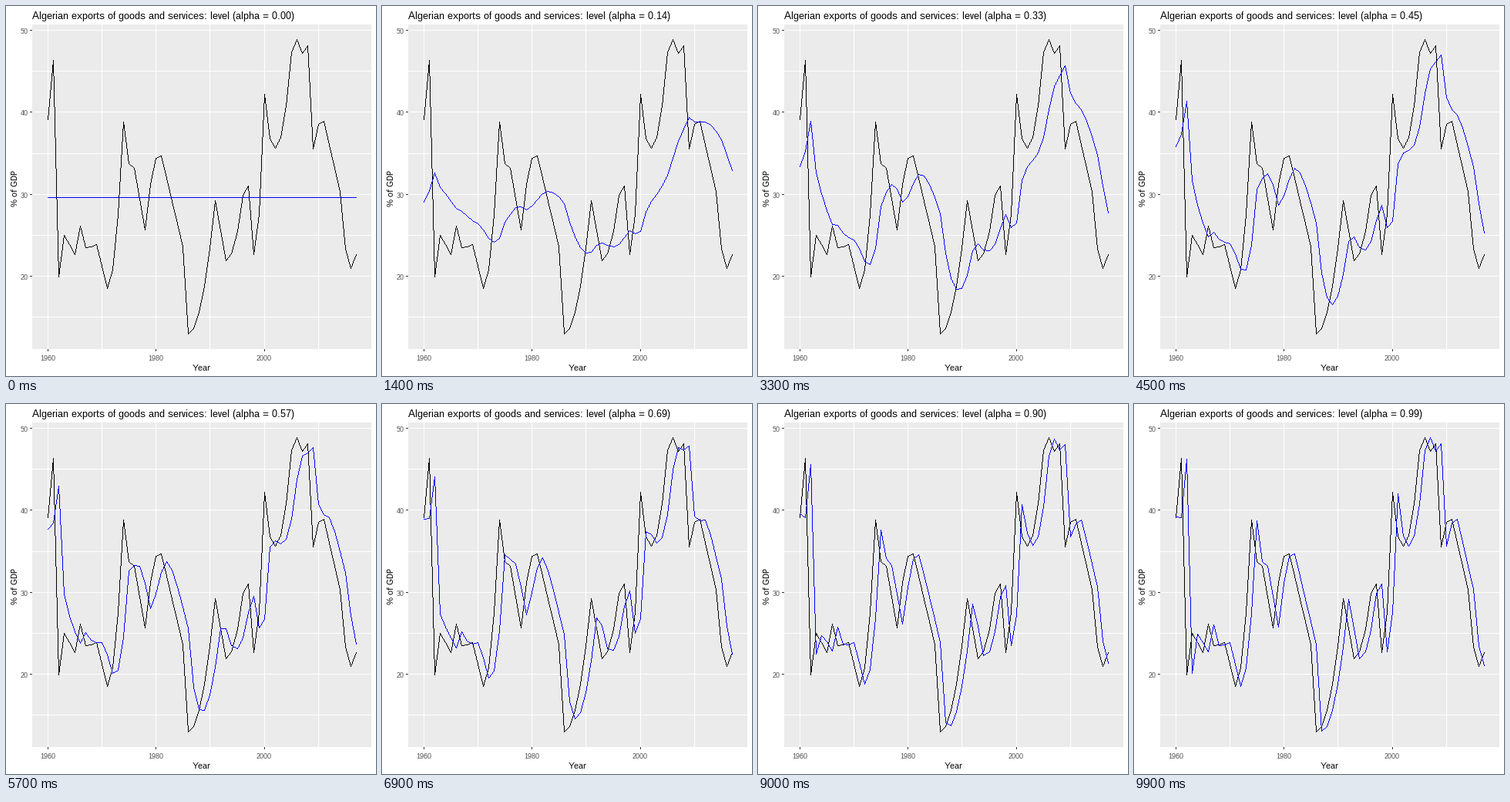
Recreate the animation shown at these times as a matplotlib script. Size 480 by 480 pixels, loop 10 s.

```python
import numpy as np
import matplotlib.pyplot as plt
from matplotlib.animation import FuncAnimation
from matplotlib.patches import Rectangle

SIZE, DPI = 480, 96
PX = 72 / DPI  # points per pixel
FRAMES, INTERVAL = 100, 100
LEFT, TOP, RIGHT, BOTTOM = 34, 24, 474, 445

plt.rcParams.update({
    "font.family": "Liberation Sans",
    "text.hinting": "default",
    "text.hinting_factor": 1,
})

# Corners of the export curve: years after 1960 and % of GDP
CORNERS = {
    0: 39, 1: 46.2, 2: 19.8, 3: 24.9, 5: 22.6, 6: 26, 7: 23.4, 9: 23.8,
    11: 18.4, 14: 38.7, 15: 33.6, 16: 33.1, 18: 25.6, 19: 31.1, 20: 34.3,
    21: 34.6, 25: 23.5, 26: 12.9, 31: 29.1, 33: 21.8, 36: 29.8, 37: 30.9,
    38: 22.6, 40: 42.1, 41: 36.7, 42: 35.5, 45: 47.2, 46: 48.8, 47: 47.1,
    48: 48, 49: 35.4, 50: 38.4, 51: 38.8, 54: 30.2, 55: 23.2, 56: 20.9,
    57: 22.6,
}


def yearly(corners):
    """Yearly values: falls are straight, rises start slowly."""
    points = list(corners.items())
    values = [points[0][1]]
    for (t0, a), (t1, b) in zip(points, points[1:]):
        t = np.arange(1, t1 - t0 + 1) / (t1 - t0)
        values.extend(a + (b - a) * t ** (2 if b > a else 1))
    return np.array(values)


def smooth(start, alpha, data):
    """One-step-ahead levels of simple exponential smoothing."""
    levels = [start]
    for value in data[:-1]:
        levels.append(alpha * value + (1 - alpha) * levels[-1])
    return np.array(levels)


def best_levels(alpha, data):
    """Smoothed levels with the least-squares starting level."""
    base = smooth(0, alpha, data)
    decay = (1 - alpha) ** np.arange(len(data))
    start = decay @ (data - base) / (decay @ decay)
    return base + start * decay


def to_x(year):
    return np.rint(53.9 + 400 * (year - 1960) / 57).astype(int)


def to_y(value):
    return np.rint(31 + 10.64 * (50 - value)).astype(int)


def trace(values):
    """Pixels of a one-pixel polyline through the yearly values."""
    x, y = to_x(1960 + np.arange(len(values))), to_y(values)
    steps = np.maximum(np.abs(np.diff(x)), np.abs(np.diff(y)))
    at = np.append(0, np.cumsum(steps))
    t = np.arange(at[-1] + 1)
    return np.rint(np.interp(t, at, x)), np.rint(np.interp(t, at, y))


fig = plt.figure(figsize=(SIZE / DPI, SIZE / DPI), dpi=DPI, facecolor="white")
ax = fig.add_axes([0, 0, 1, 1])
ax.set(xlim=(0, SIZE), ylim=(SIZE, 0))
ax.axis("off")


def bar(x, y, w, h, color):
    ax.add_patch(Rectangle((x, y), w, h, fc=color, lw=0, antialiased=False))


def label(x, y, text, size, color="black", **kw):
    return ax.text(x, y, text, fontsize=size * PX, color=color, **kw)


def curve(values, color):
    return ax.plot(*trace(values), ",", color=color, antialiased=False)[0]


bar(LEFT, TOP, RIGHT - LEFT, BOTTOM - TOP, "#ebebeb")
for value in range(15, 51, 5):
    bar(LEFT, to_y(value), RIGHT - LEFT, 1, "white")
for year in range(1960, 2011, 10):
    bar(to_x(year), TOP, 1, BOTTOM - TOP, "white")

for value in range(20, 51, 10):
    y = to_y(value)
    bar(LEFT - 3, y, 3, 1, "#333333")
    label(29, y + 5, str(value), 9, "#4d4d4d", ha="right")
for year in range(1960, 2001, 20):
    x = to_x(year)
    bar(x, BOTTOM, 1, 3, "#333333")
    label(x, 460, str(year), 9, "#4d4d4d", ha="center")

label(254, 473, "Year", 11, ha="center")
label(17, 236, "% of GDP", 11, rotation=90, ha="right", va="center")
title = label(LEFT, 17, "", 13)

exports = yearly(CORNERS)
curve(exports, "black")
level = curve(exports, "blue")


def update(i):
    alpha = i / FRAMES
    level.set_data(*trace(best_levels(alpha, exports)))
    title.set_text("Algerian exports of goods and services: "
                   f"level (alpha = {alpha:.2f})")
    return level, title


anim = FuncAnimation(fig, update, frames=FRAMES, interval=INTERVAL,
                     repeat=True, repeat_delay=0)
plt.show()
```
